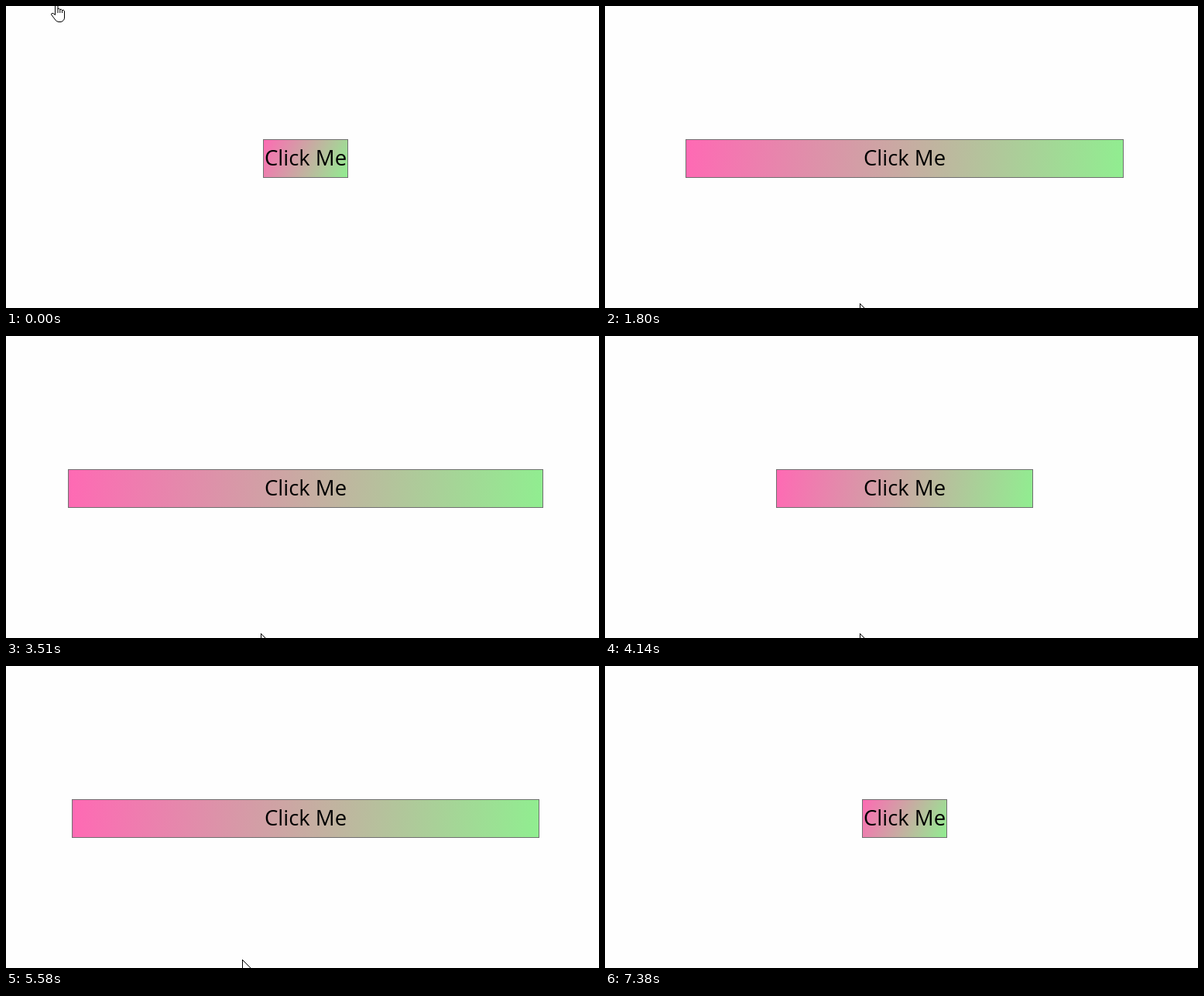
Write an HTML page that moves like this. It is 766 by 390 pixels and loops after 7.74 s.

```html
<!DOCTYPE html>
<html lang="en">
<head>
<meta charset="utf-8">
<title>Button width animation</title>
<style>
  html, body { margin: 0; width: 100%; height: 100%; overflow: hidden; background: #fefefe; }
  svg { display: block; }
  text { font: 27.5px "Open Sans", "Noto Sans", sans-serif; text-anchor: middle; }
  .pointer { fill: #fff; stroke: #000; }
  #arrow { shape-rendering: crispEdges; }
</style>
</head>
<body>
<svg width="766" height="390" viewBox="0 0 766 390">
  <defs>
    <linearGradient id="fade" gradientUnits="userSpaceOnUse" y1="172" y2="222">
      <stop offset="0" stop-color="#ff69b4"/>
      <stop offset="1" stop-color="#90ee90"/>
    </linearGradient>
  </defs>
  <rect id="button" y="172.5" height="49" fill="url(#fade)" stroke="#707070"/>
  <text x="387" y="206">Click Me</text>
  <path id="arrow" class="pointer" d="M.5 .5V16.5L4.2 12.9 6.7 18.5 9 17.5 6.6 11.5H11.5Z"/>
  <path id="hand" class="pointer" d="M63.5 -1V11.5L61 9.5Q58.5 8.8 58.5 11L63 17Q65 20.5 68 20.5H71Q75.5 19 75.5 15V6.5Q74.5 4.5 72.5 5.5 71.5 3.5 69.5 4.5 69 2.5 67 3.5V-1Q65.2 -3 63.5 -1ZM67 3V9M69.8 4.5V9M72.6 5.5V9"/>
</svg>
<script>
const LOOP = 7740, STEP = 90, CENTER = 387;
const MIN_WIDTH = 110, MAX_WIDTH = 651;
const PULSE_START = 689, PULSE = 1923, PULSES = 3;

// Pointer stops, reached with an ease-out
const stops = [
  { at: 90, x: 66, y: 8 },
  { at: 900, x: 329, y: 384 },
  { at: 4950, x: 329, y: 384 },
  { at: 5400, x: 305, y: 379 },
  { at: 6570, x: 305, y: 379 },
  { at: 6840, x: 425, y: 240 },
  { at: 7380, x: -40, y: -30 }
];

const mix = (a, b, k) => a + (b - a) * k;
const easeOut = k => 1 - (1 - k) ** 2;

function set(id, attributes) {
  const element = document.getElementById(id);
  for (const name in attributes) element.setAttribute(name, attributes[name]);
}

// The width grows and shrinks at constant speed
function widthAt(t) {
  const pulses = (t - PULSE_START) / PULSE;
  if (pulses < 0 || pulses > PULSES) return MIN_WIDTH;
  return mix(MIN_WIDTH, MAX_WIDTH, 1 - Math.abs(2 * (pulses % 1) - 1));
}

function pointerAt(t) {
  const next = stops.findIndex(stop => stop.at > t);
  if (next < 1) return next ? stops[stops.length - 1] : stops[0];
  const a = stops[next - 1], b = stops[next];
  const k = easeOut((t - a.at) / (b.at - a.at));
  return { x: mix(a.x, b.x, k), y: mix(a.y, b.y, k) };
}

function draw(now) {
  const t = Math.floor(now % LOOP / STEP) * STEP;
  const half = Math.floor(widthAt(t) / 2);
  set('button', { x: CENTER - half + .5, width: 2 * half - 1 });
  set('fade', { x1: CENTER - half, x2: CENTER + half });

  const { x, y } = pointerAt(t);
  const entering = t < STEP;
  set('arrow', {
    transform: `translate(${Math.round(x)} ${Math.round(y)})`,
    visibility: entering ? 'hidden' : 'visible'
  });
  set('hand', { visibility: entering ? 'visible' : 'hidden' });
}

const start = performance.now();
function tick() {
  draw(performance.now() - start);
  requestAnimationFrame(tick);
}
tick();
</script>
</body>
</html>
```
